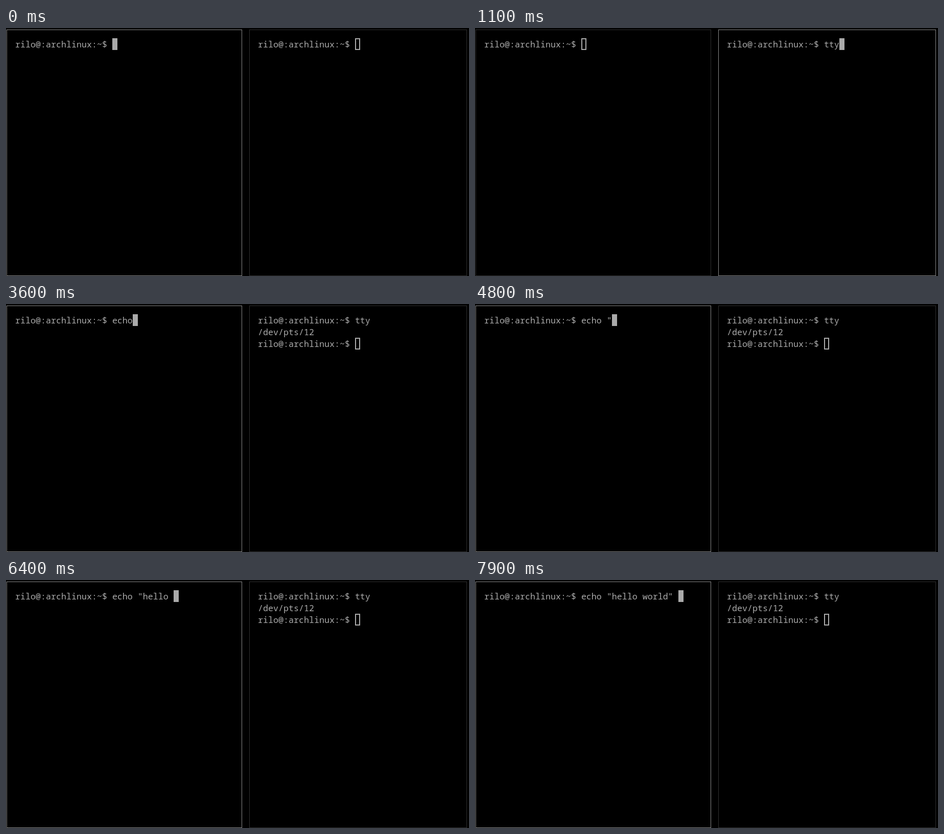
Recreate the animation shown at these times as an HTML page with a canvas. Size 906 px wide and 485 px high, loop 8 s.

```html
<!DOCTYPE html>
<html lang="en">
<head>
<meta charset="utf-8">
<title>Two terminals</title>
<style>
  html, body { margin: 0; width: 100%; height: 100%; overflow: hidden; background: #000; }
  canvas { display: block; }
</style>
</head>
<body>
<canvas id="stage" width="906" height="485"></canvas>
<script>
const ctx = document.getElementById('stage').getContext('2d', { alpha: false });
const LOOP = 8000, CELL = 10, LINE = 23;
const PROMPT = 'rilo@:archlinux:~$ ';
const INK = '#aaaaaa', ACTIVE = '#888888', INACTIVE = '#2e2e2e';

// Times at which each key appears
const ttyKeys = [900, 1000, 1100];
const echoKeys = [3100, 3300, 3500, 3600, 4000, 4800, 5100, 5600, 5800, 6000,
                  6200, 6400, 6500, 6600, 7100, 7300, 7500, 7800, 7900];
const FOCUS_RIGHT = 100, ENTER = 1600, FOCUS_LEFT = 2500;

const typed = (text, keys, t) => text.slice(0, keys.filter(k => k <= t).length);

function frame(x, y, w, h, thickness, color) {
  ctx.strokeStyle = color;
  ctx.lineWidth = thickness;
  ctx.strokeRect(x + thickness / 2, y + thickness / 2, w - thickness, h - thickness);
}

function terminal(x, width, lines, focused) {
  frame(x, 3, width, 482, 1, focused ? ACTIVE : INACTIVE);
  const left = x + 17, top = 20;
  ctx.fillStyle = INK;
  lines.forEach((line, i) => ctx.fillText(line, left, top + 18 + i * LINE));

  const row = lines.length - 1;
  const cursorX = left + lines[row].length * CELL, cursorY = top + row * LINE;
  if (focused) ctx.fillRect(cursorX, cursorY, CELL, LINE);
  else frame(cursorX, cursorY, CELL, LINE, 2, INK);
}

function draw(t) {
  ctx.fillStyle = '#000';
  ctx.fillRect(0, 0, 906, 485);
  ctx.font = '16.667px "Noto Sans Mono", monospace';

  const rightFocused = t >= FOCUS_RIGHT && t < FOCUS_LEFT;
  const rightLines = [PROMPT + typed('tty', ttyKeys, t)];
  if (t >= ENTER) rightLines.push('/dev/pts/12', PROMPT);

  terminal(1, 461, [PROMPT + typed('echo "hello world" ', echoKeys, t)], !rightFocused);
  terminal(476, 426, rightLines, rightFocused);
}

function tick() {
  draw(performance.now() % LOOP);
  requestAnimationFrame(tick);
}
tick();
</script>
</body>
</html>
```
